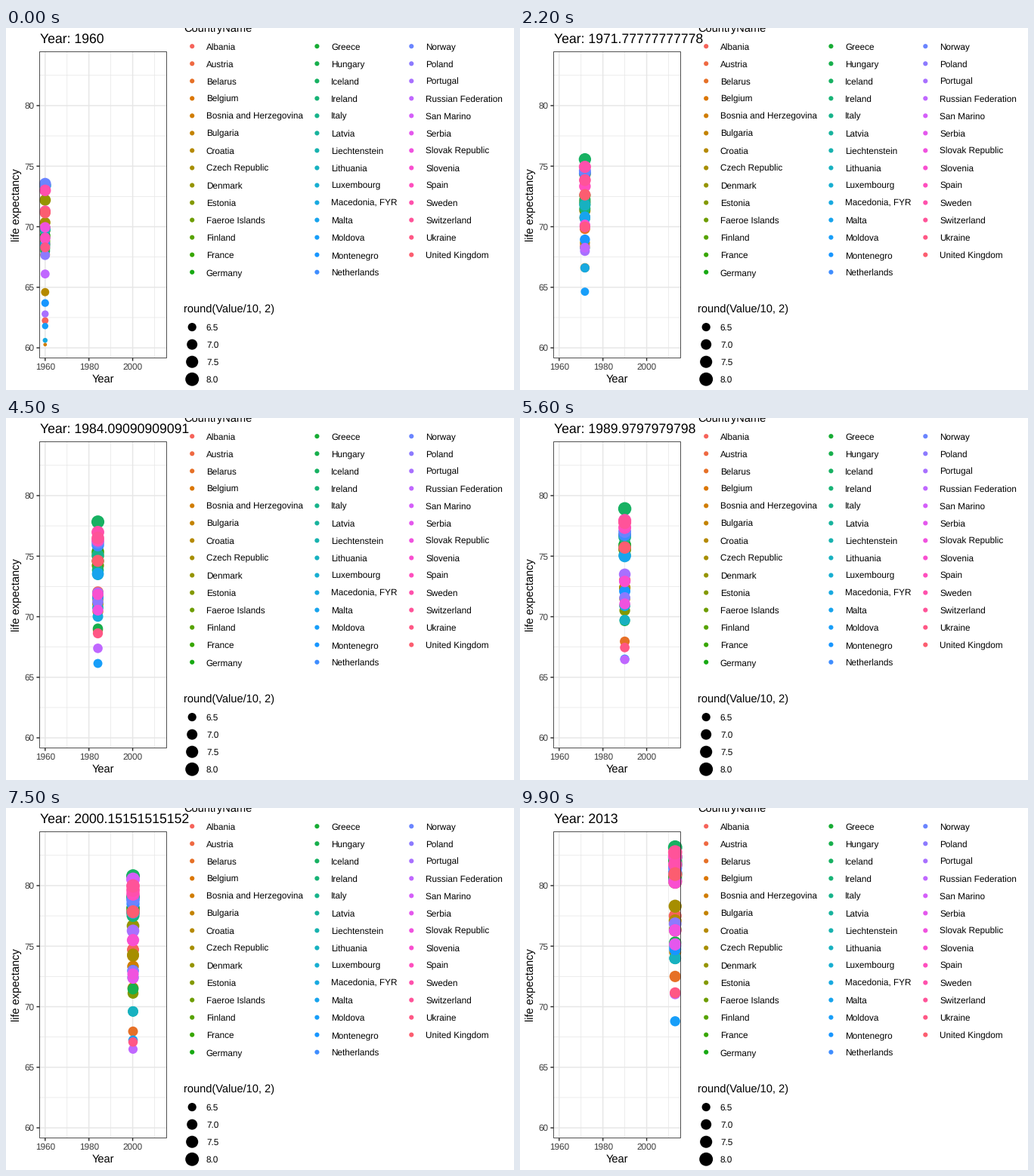
Animation, 672 px wide and 480 px high, one loop 10 s. Source, as a matplotlib script:

```python
import numpy as np
import matplotlib.pyplot as plt
from matplotlib.animation import FuncAnimation
from matplotlib.patches import Rectangle

W, H, DPI = 672, 480, 96
FRAMES, INTERVAL = 100, 100
FIRST, LAST = 1960, 2013
PT = 72 / DPI                                  # points per pixel

LEFT, RIGHT, TOP, BOTTOM = 44.1, 212.9, 31.2, 437.8
BASE, SMALL, LARGE = 11, 8.8, 13.2             # font sizes in points
GRID, EDGE, TICK_TEXT = "#e6e6e6", "#262626", "#3c3c3c"
ROW = 23.04                                    # legend row height
KEY_X = (246.2, 411.4, 536.3)
KEY_Y, SIZE_Y = 24.2, 396.6
LABEL_DX, LABEL_DY = 18.7, 4.4

# How a country departs from a straight rise: (bow, wave) in years of life
SHAPES = {
    "steady": (0, 0),
    "late": (-1, 0),
    "early": (1, 0.6),
    "surge": (2.6, 1),
    "stall": (-2.4, 0.3),
    "slump": (-0.9, 1),
    "dip": (-1.6, 2.2),
}

# Shape, first and last life expectancy, one dict per legend column
COLUMNS = (
    {
        "Albania": ("surge", 62.25, 77.5),
        "Austria": ("steady", 68.6, 80.9),
        "Belarus": ("dip", 67.7, 72.5),
        "Belgium": ("steady", 69.7, 80.4),
        "Bosnia and Herzegovina": ("surge", 60.27, 76.3),
        "Bulgaria": ("slump", 69.2, 74.5),
        "Croatia": ("early", 64.6, 77.1),
        "Czech Republic": ("stall", 70.35, 78.3),
        "Denmark": ("slump", 72.2, 80.3),
        "Estonia": ("dip", 68.5, 76.4),
        "Faeroe Islands": ("late", 70, 81.7),
        "Finland": ("steady", 68.8, 80.8),
        "France": ("steady", 69.9, 82),
        "Germany": ("steady", 69.3, 81),
    },
    {
        "Greece": ("early", 68.2, 80.6),
        "Hungary": ("stall", 68, 75.3),
        "Iceland": ("steady", 73.4, 83.15),
        "Ireland": ("late", 69.7, 81),
        "Italy": ("steady", 69.1, 82.3),
        "Latvia": ("dip", 69.8, 74),
        "Liechtenstein": ("steady", 68, 82.4),
        "Lithuania": ("dip", 69.8, 74),
        "Luxembourg": ("late", 68.4, 81.8),
        "Macedonia, FYR": ("surge", 60.62, 75),
        "Malta": ("late", 68.6, 81.7),
        "Moldova": ("early", 61.8, 68.8),
        "Montenegro": ("surge", 63.7, 74.75),
        "Netherlands": ("late", 73.4, 81.1),
    },
    {
        "Norway": ("late", 73.55, 81.45),
        "Poland": ("slump", 67.65, 76.85),
        "Portugal": ("early", 62.8, 80.4),
        "Russian Federation": ("dip", 66.1, 71.07),
        "San Marino": ("steady", 71.5, 83.4),
        "Serbia": ("slump", 70.5, 75.15),
        "Slovak Republic": ("stall", 69.95, 76.3),
        "Slovenia": ("stall", 69, 80.3),
        "Spain": ("early", 69.1, 82.4),
        "Sweden": ("steady", 73, 81.75),
        "Switzerland": ("steady", 71.3, 82.75),
        "Ukraine": ("dip", 68.3, 71.15),
        "United Kingdom": ("late", 71.15, 80.95),
    },
)
# Years on record where they do not cover the whole span
RECORD = {
    "Faeroe Islands": (1990, LAST),
    "Liechtenstein": (1994, LAST),
    "San Marino": (1995, 2012),
    "Serbia": (1990, LAST),
}


def life(name, shape, start, end, year):
    since, until = RECORD.get(name, (FIRST, LAST))
    if not since <= year <= until:
        return np.nan
    bow, wave = SHAPES[shape]
    s = (year - FIRST) / (LAST - FIRST)
    return start + (end - start) * s + bow * 4 * s * (1 - s) + wave * np.sin(2 * np.pi * s)


def hue_color(h):
    """Polar LUV colour with chroma 100 and luminance 65, encoded at gamma 1.8."""
    a = np.radians(h)
    y = ((65 + 16) / 116) ** 3
    u = 100 * np.cos(a) / (13 * 65) + 0.1978
    v = 100 * np.sin(a) / (13 * 65) + 0.4683
    x = 9 / 4 * y * u / v
    z = -x / 3 - 5 * y + 3 * y / v
    to_rgb = np.array([[3.2405, -1.5371, -0.4985],
                       [-0.9693, 1.8760, 0.0416],
                       [0.0556, -0.2040, 1.0572]])
    rgb = np.clip(to_rgb @ (x, y, z), 0, 1) ** (1 / 1.8)
    rgb[0] = max(rgb[0], 0.09)
    return rgb


def px(year):
    span = (RIGHT - LEFT) / 1.1
    return LEFT + span * (0.05 + (year - FIRST) / (LAST - FIRST))


def py(value):
    return 424.1 - 16.06 * (value - 60)


def area(diameter):
    return (diameter * PT) ** 2


def diameter(size):
    return 0.75 * (size * 2.845 + 0.945) * DPI / 72 + 0.945


def value_diameter(value):
    share = np.clip((value - 60.27) / (83.3 - 60.27), 0, 1)
    return diameter(1 + 5 * np.sqrt(share))


plt.rcParams.update({"font.family": "Liberation Sans", "text.hinting": "none"})
fig = plt.figure(figsize=(W / DPI, H / DPI), dpi=DPI, facecolor="white")
ax = fig.add_axes([0, 0, 1, 1])
ax.set_xlim(0, W)
ax.set_ylim(H, 0)
ax.axis("off")


def text(x, y, s, size=SMALL, ha="left", color="black", **kw):
    return ax.text(x, y, s, fontsize=size, ha=ha, va="baseline", color=color, **kw)


def line(xs, ys, width, color, z):
    ax.plot(xs, ys, color=color, lw=width * PT, solid_capstyle="butt",
            snap=False, zorder=z)


def dots(x, y, d, color, z=5):
    return ax.scatter(x, y, s=area(d), c=color, linewidths=0, zorder=z)


# Panel
for year in (1970, 1990, 2010):
    line([px(year)] * 2, [TOP, BOTTOM], 0.71, GRID, 1)
for value in np.arange(62.5, 83, 5):
    line([LEFT, RIGHT], [py(value)] * 2, 0.71, GRID, 1)
for year in (1960, 1980, 2000):
    line([px(year)] * 2, [TOP, BOTTOM], 1.42, GRID, 2)
    line([px(year)] * 2, [BOTTOM, BOTTOM + 3.67], 1.42, EDGE, 6)
    text(px(year), 452.9, str(year), ha="center", color=TICK_TEXT)
for value in range(60, 81, 5):
    line([LEFT, RIGHT], [py(value)] * 2, 1.42, GRID, 2)
    line([LEFT - 3.67, LEFT], [py(value)] * 2, 1.42, EDGE, 6)
    text(37.5, py(value) + 4.2, str(value), ha="right", color=TICK_TEXT)
ax.add_patch(Rectangle((LEFT + 0.35, TOP + 0.35), RIGHT - LEFT - 0.7, BOTTOM - TOP - 0.7,
                       fill=False, ec=EDGE, lw=0.8 * PT, snap=False, zorder=6))
text((LEFT + RIGHT) / 2, 469.8, "Year", BASE, "center")
text(18, (TOP + BOTTOM) / 2, "life expectancy", BASE, "center",
     rotation=90, rotation_mode="anchor")

# Legends
countries = [(name, *row) for column in COLUMNS for name, row in column.items()]
count = len(countries)
colors = [hue_color(15 + 360 * i / count) for i in range(count)]

text(234.9, 4.6, "CountryName", BASE)
keys = [(x, KEY_Y + ROW * row) for x, column in zip(KEY_X, COLUMNS)
        for row in range(len(column))]
dots(*zip(*keys), diameter(1.5), colors)
for (x, y), (name, *_) in zip(keys, countries):
    text(x + LABEL_DX, y + LABEL_DY, name)

text(234.9, 377, "round(Value/10, 2)", BASE)
sizes = np.arange(6.5, 8.1, 0.5)
size_y = SIZE_Y + ROW * np.arange(len(sizes))
dots(np.full(len(sizes), KEY_X[0]), size_y, value_diameter(10 * sizes), "black")
for value, y in zip(sizes, size_y):
    text(KEY_X[0] + LABEL_DX, y + LABEL_DY, f"{value:.1f}")

# Moving parts
title = text(LEFT + 0.6, 20.3, "", LARGE, zorder=8)
points = dots(np.zeros(count), np.zeros(count), 1, colors, 4)


def update(i):
    year = FIRST + (LAST - FIRST) * i / (FRAMES - 1)
    title.set_text(f"Year: {year:.15g}")
    values = np.array([life(*country, year) for country in countries])
    points.set_offsets(np.column_stack([np.full(count, px(year)), py(values)]))
    points.set_sizes(np.nan_to_num(area(value_diameter(values))))
    return title, points


anim = FuncAnimation(fig, update, frames=FRAMES, interval=INTERVAL,
                     init_func=lambda: update(0), repeat=True, repeat_delay=0)
plt.show()
```
